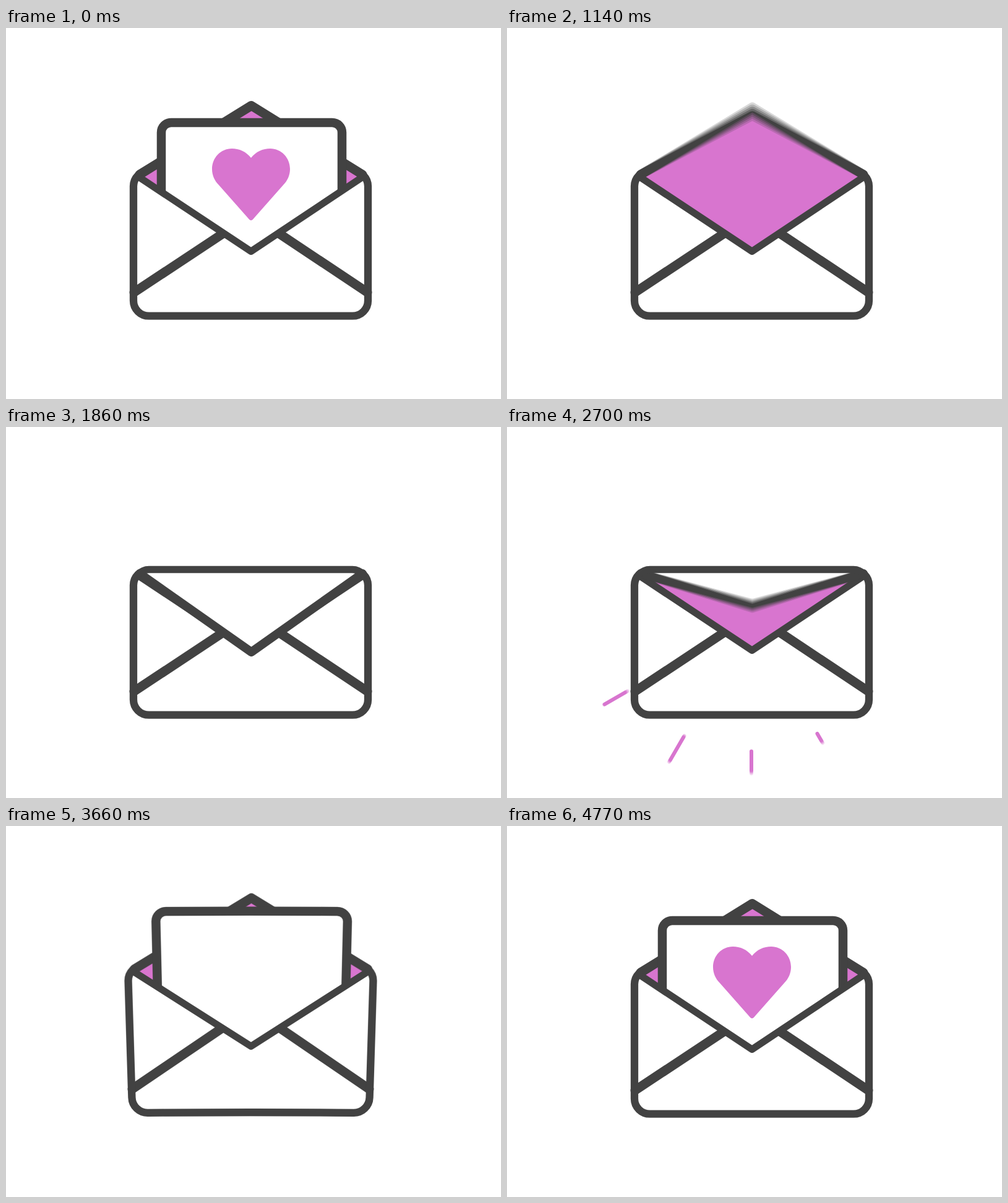
Animation, 800 px wide and 600 px high, one loop 4.8 s. Source, as an HTML page:

```html
<!DOCTYPE html>
<html lang="en">
<head>
<meta charset="utf-8">
<title>Love letter</title>
<style>
html, body { margin: 0; width: 100%; height: 100%; overflow: hidden; background: #fff; }
svg { display: block; width: 100vw; height: 100vh; }
</style>
</head>
<body>
<svg id="stage" viewBox="0 0 800 600"></svg>
<script>
const LOOP = 4800, STEP = 30;
const INK = '#424242', PINK = '#d875cf', WHITE = '#fff';
const HINGE = 238, MID = 395.5;
const SHUTTER = [-7, -3.5, 0, 3.5, 7];
const stage = document.getElementById('stage');

// Keyframes: [time, value]
const FLAP = [[780, 125.5], [1050, 83.5], [1380, 364], [2580, 364], [2700, 289], [3110, 77], [3320, 125.5]];
const LETTER = [[735, 0], [1050, 250], [3210, 250], [3330, 180], [3600, -8], [4020, 10], [4450, 0]];
const BEND = [[1200, 0], [1390, .7], [1440, .62], [1640, .4], [1870, 0], [3090, 0],
  [3330, 1.03], [3790, -1.4], [4020, -1], [4260, -.3], [4520, 0]];
const HEART = [[0, 1], [450, 1.022], [1200, 1.022], [1201, 0], [3870, 0], [4020, .75],
  [4200, 1.08], [4450, .985], [4650, 1]];
const RING = [[3740, 0], [4020, 1.45], [4110, 1.55]];
const HOLE = [[3800, 0], [4020, 1.285], [4110, 1.56]];
const DROP = [[3700, 8], [4020, 8], [4400, 0]];

const clamp = v => Math.min(1, Math.max(0, v));
const smooth = v => { v = clamp(v); return v * v * (3 - 2 * v); };

// Monotone cubic interpolation, flat at extremes
function track(keys, t) {
  const n = keys.length - 1;
  if (t <= keys[0][0]) return keys[0][1];
  if (t >= keys[n][0]) return keys[n][1];
  let i = 0;
  while (t > keys[i + 1][0]) i++;
  const rate = k => (keys[k + 1][1] - keys[k][1]) / (keys[k + 1][0] - keys[k][0]);
  const slope = k => {
    if (k < 1 || k >= n) return 0;
    const a = rate(k - 1), b = rate(k);
    return a * b > 0 ? 2 * a * b / (a + b) : 0;
  };
  const [t0, v0] = keys[i], [t1, v1] = keys[i + 1];
  const h = t1 - t0, u = (t - t0) / h, w = 1 - u;
  return w * w * (1 + 2 * u) * v0 + u * u * (3 - 2 * u) * v1
    + h * u * w * (w * slope(i) - u * slope(i + 1));
}

// Soft push down (p > 0) or pull up (p < 0)
function bend(p) {
  return (x, y) => {
    const u2 = ((x - MID) / 190) ** 2, q = Math.abs(p);
    const s = p > 0 ? .044 + .00012 * (y - 350) : .031 - .00018 * (y - 350);
    const dy = p > 0 ? 9.5 - 2.4 * u2 : 2 * u2 - 3.5 - 6.5 * (467 - y) / 349;
    return [MID + (x - MID) * (1 + q * s), y + q * dy];
  };
}

const mapPath = (d, fn) => d.replace(/(-?[\d.]+) (-?[\d.]+)/g,
  (_, x, y) => fn(+x, +y).map(v => v.toFixed(2)).join(' '));

const shape = (d, fill, width = 0) => `<path d="${d}" fill="${fill}"` + (width ?
  ` stroke="${INK}" stroke-width="${width}" stroke-linejoin="round" stroke-linecap="round"` : '') + '/>';

const SIDES = 'C208.8 242.8 206 249 206 256L206 441C206 454.8 217.2 465.7 231 465.7Q395.5 465.7 560 465.7' +
  'C573.8 465.7 585 454.8 585 441L585 256C585 249 582.2 242.8 577.7 238.3';
const OUTLINE = 'M213.3 238.3' + SIDES;
const TOP = 'M213.3 238.3C217.8 233.8 224 230.4 231 230.4Q395.5 230.4 560 230.4C567 230.4 573.2 233.8 577.7 238.3';
const VEE = 'M214 240.5L396 361.3L577 240.5';
const FOLDS = 'M349 333.5L207 427.5M443 333.5L584 427.5';
const HEART_PATH = 'M396 210C388 200 377 195 365 195C347 195 333 210 333 228C333 238 337 247 344 254' +
  'L393 309.5Q396 312.5 399 309.5L448 254C455 247 459 238 459 228C459 210 445 195 427 195' +
  'C415 195 404 200 396 210Z';

function rays(t) {
  let d = '';
  for (let i = 0; i < 12; i++) {
    const age = t - 2495 - 45 * i;
    const tail = 213 + 62 * smooth((age - 120) / 220);
    const head = 213 + 62 * smooth(age / 220);
    if (head - tail < .5) continue;
    const a = (150 - 30 * i) * Math.PI / 180;
    const at = r => `${(395 + r * Math.cos(a)).toFixed(2)} ${(311.5 + r * Math.sin(a)).toFixed(2)}`;
    d += `M${at(tail)}L${at(head)}`;
  }
  return `<path d="${d}" fill="none" stroke="${PINK}" stroke-width="6" stroke-linecap="round"/>`;
}

function letter(t, put) {
  const y = track(LETTER, t), top = 153 + y, c = top + 16, k = top + 7;
  const paper = `M251 440L251 ${c}C251 ${k} 258 ${top} 267 ${top}Q397 ${top} 527 ${top}` +
    `C536 ${top} 543 ${k} 543 ${c}L543 440`;
  const drop = t > 3500 ? track(DROP, t) : 0;
  const heart = (size, fill) => {
    if (size < .01) return '';
    const sized = mapPath(HEART_PATH, (x, v) => [396 + (x - 396) * size, 253 + (v - 253) * size + y + drop]);
    return put(sized, fill);
  };
  const ring = track(RING, t), hole = track(HOLE, t);
  const burst = ring > hole ? heart(ring, PINK) + heart(hole, WHITE) : '';
  return '<g clip-path="url(#pocket)">' + put(paper, WHITE, 14.5) + burst +
    heart(track(HEART, t), PINK) + '</g>';
}

function scene(t) {
  const warp = bend(track(BEND, t));
  const put = (d, fill, width) => shape(mapPath(d, warp), fill, width);
  const tip = track(FLAP, t), open = tip < HINGE;
  const flap = `M216 237L396.5 ${tip.toFixed(2)}L576 237`;
  let out = rays(t);

  out += put(VEE + 'Z', PINK);
  if (open) out += put(flap + 'L396 361.3Z', PINK) + put(flap, 'none', 15);
  out += letter(t, put);

  out += put(OUTLINE + 'L396 361.3Z', WHITE);
  out += put(FOLDS, 'none', 15) + put(VEE, 'none', 11.3) + put(OUTLINE, 'none', 12.3);

  if (!open) out += put(TOP + 'Z', WHITE) + put(flap, WHITE, 14) + put(TOP, 'none', 11.5);
  return out;
}

// Average several moments for motion blur
function draw(t) {
  const pocket = '<clipPath id="pocket"><rect width="800" height="455"/></clipPath>';
  stage.innerHTML = pocket + SHUTTER.map((dt, i) =>
    `<g opacity="${1 / (i + 1)}"><rect width="800" height="600" fill="${WHITE}"/>` +
    scene((t + dt + LOOP) % LOOP) + '</g>').join('');
}

const start = performance.now();
let last = -1;
function tick() {
  const t = Math.floor((performance.now() - start) % LOOP / STEP) * STEP;
  if (t !== last) draw(last = t);
  requestAnimationFrame(tick);
}
tick();
</script>
</body>
</html>
```
